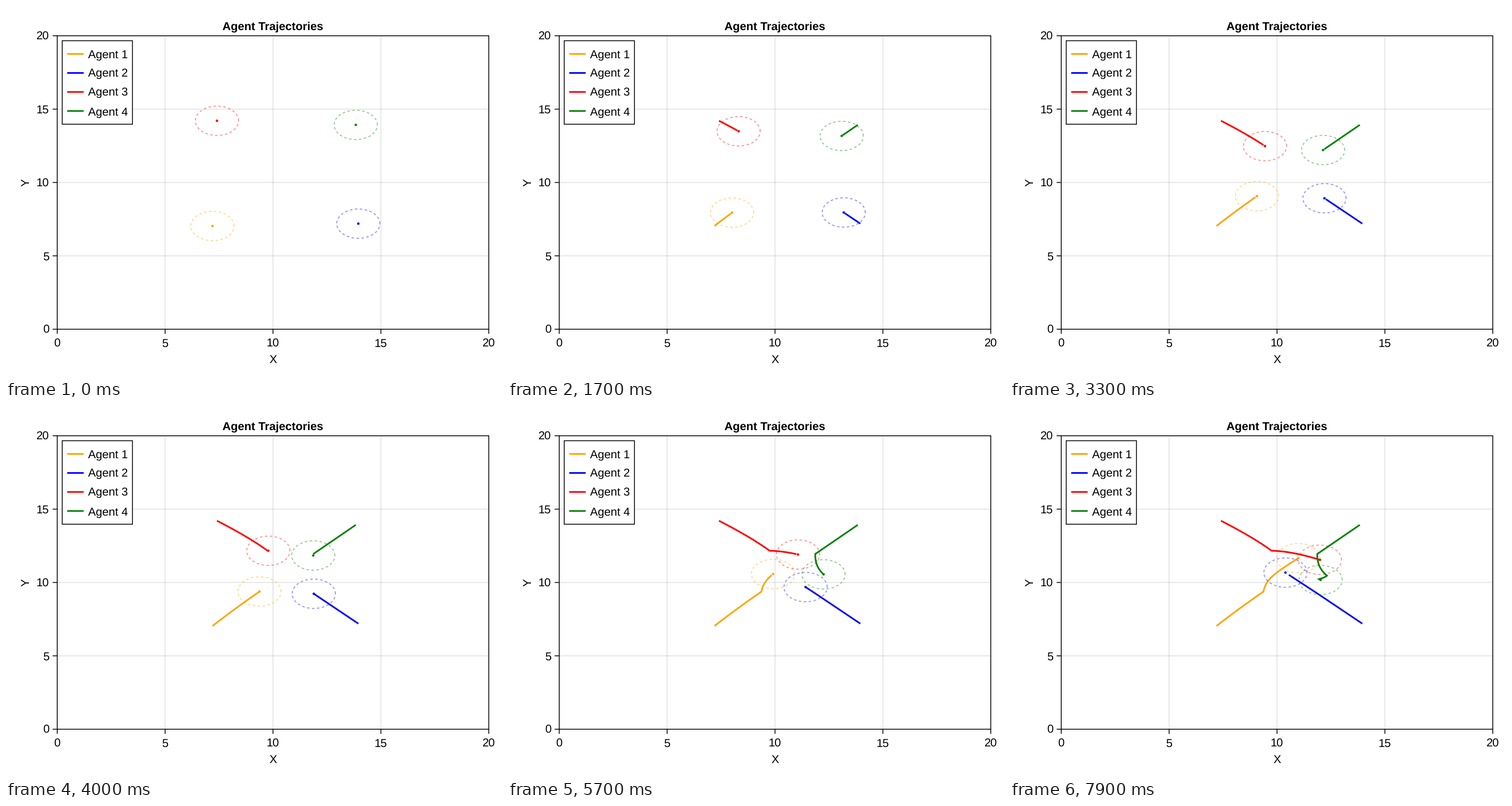
Write a matplotlib script that moves like this. It is 864 by 648 pixels and loops after 8000 ms.

```python
import numpy as np
import matplotlib.pyplot as plt
from matplotlib.animation import FuncAnimation

FRAMES, STEP_MS = 80, 100
W, H = 864, 648
S = 1.44  # pixels per layout unit
LEFT, RIGHT, TOP, BOTTOM = 62 * S, 584 * S, 36 * S, 391 * S
UNIT_X, UNIT_Y = (RIGHT - LEFT) / 20, (BOTTOM - TOP) / 20
THIN, THICK, FONT = S, 2 * S, 14 * S
TURN = 39  # step at which the agents start to avoid each other

# Bezier control points to and after the turn, and the easing after it
AGENTS = {
    "orange": ([(359.6, 383.2), (400.5, 351.5), (441.5, 323.3)],
               [[(441.5, 323.3), (446, 301.5), (459, 292.5), (502.2, 265)]],
               (1.9, 2.3)),
    "blue": ([(613.7, 379.1), (537.4, 327.9)],
             [[(537.4, 327.9), (479.8, 290.2)]],
             (0.9, 0.6)),
    "red": ([(367.5, 199.9), (425, 229.5), (455.6, 252.1)],
            [[(455.6, 252.1), (483, 252.6), (512, 259.5), (539.8, 267.9)]],
            (1.3, 2)),
    "green": ([(609.3, 207.1), (535.2, 257.8)],
              [[(535.2, 257.8), (535, 272), (538.5, 284), (552.3, 295.6)],
               [(552.3, 295.6), (547, 299.5), (538, 301.5)],
               [(538, 301.5), (541, 303)]],
              (1, 1.7)),
}

plt.rcParams.update({"font.family": "Liberation Sans",
                     "text.hinting": "no_hinting"})
fig = plt.figure(figsize=(W / 72, H / 72), dpi=72, facecolor="white")
ax = fig.add_axes([0, 0, 1, 1])
ax.set_xlim(0, W)
ax.set_ylim(H, 0)
ax.axis("off")


def line(xs, ys, color="black", lw=THIN, z=1, **kw):
    return ax.plot(xs, ys, color=color, lw=lw, zorder=z, snap=False,
                   solid_capstyle="butt", solid_joinstyle="miter", **kw)[0]


def label(x, y, text, ha="center", z=1, **kw):
    ax.text(x, y, text, ha=ha, va="baseline", fontsize=FONT, zorder=z, **kw)


def box(x0, y0, x1, y1, z, fill="none"):
    ax.add_patch(plt.Rectangle((x0, y0), x1 - x0, y1 - y0, fc=fill, ec="black",
                               lw=THIN, zorder=z, snap=False))


def draw_axes():
    for v in range(0, 21, 5):
        x, y = LEFT + v * UNIT_X, BOTTOM - v * UNIT_Y
        if 0 < v < 20:
            line([x, x], [TOP, BOTTOM], alpha=0.12)
            line([LEFT, RIGHT], [y, y], alpha=0.12)
        line([x, x], [BOTTOM, BOTTOM + 8], z=5)
        line([LEFT - 8, LEFT], [y, y], z=5)
        label(x, BOTTOM + 31, str(v))
        label(LEFT - 14, y + 7.2, str(v), ha="right")
    box(LEFT, TOP, RIGHT, BOTTOM, 5)
    mid_x, mid_y = (LEFT + RIGHT) / 2, (TOP + BOTTOM) / 2
    label(mid_x, 42, "Agent Trajectories", weight="bold")
    label(mid_x, 621.7, "X")
    label(41, mid_y, "Y", rotation=90, rotation_mode="anchor")


def draw_legend():
    box(68 * S, 42 * S, 153 * S, 143 * S, 6, "white")
    for i, color in enumerate(AGENTS):
        y = (58 + 23 * i) * S
        line([74 * S, 94 * S], [y, y], color, THICK, 7)
        label(99 * S, y + 7.5, f"Agent {i + 1}", ha="left", z=7)


def bezier(points):
    t = np.linspace(0, 1, 60)[:, None]
    p = [np.array(q) for q in points]
    while len(p) > 1:
        p = [a + (b - a) * t for a, b in zip(p, p[1:])]
    return p[0]


def travel(curves, part):
    """Points at the given parts of the length of joined curves."""
    pts = np.concatenate([bezier(c) for c in curves])
    length = np.append(0, np.cumsum(np.hypot(*np.diff(pts, axis=0).T)))
    return np.array([np.interp(part * length[-1], length, axis) for axis in pts.T])


def approach(t):
    """Even speed with a short slow spell near the start."""
    u = np.clip((t - 9) / 8, 0, 1)
    return np.clip((t - 4.5 * u * u * (3 - 2 * u)) / 33, 0, 1)


def avoid(t, a, b):
    u = np.clip((t - TURN) / (FRAMES - 1 - TURN), 0, 1)
    return 1 - (1 - u ** a) ** b


class Agent:
    def __init__(self, color, first, rest, ease):
        t = np.arange(FRAMES)
        self.x, self.y = np.where(t < TURN, travel([first], approach(t)),
                                  travel(rest, avoid(t, *ease)))
        self.trail = line([], [], color, THICK, 3)
        self.ring = line([], [], color, THIN, 3, alpha=0.5,
                         dashes=(3, 3), dash_capstyle="butt")
        self.dot = ax.add_patch(plt.Circle((0, 0), 1.5 * S, fc=color, lw=0,
                                           zorder=4, snap=False))

    def show(self, n):
        x, y = self.x[n], self.y[n]
        a = np.linspace(0, 2 * np.pi, 100)
        self.trail.set_data(self.x[:n], self.y[:n])
        self.ring.set_data(x + UNIT_X * np.cos(a), y - UNIT_Y * np.sin(a))
        self.dot.set_center((x, y))


draw_axes()
draw_legend()
agents = [Agent(color, *spec) for color, spec in AGENTS.items()]


def update(n):
    for agent in agents:
        agent.show(n)
    return []


anim = FuncAnimation(fig, update, frames=FRAMES, interval=STEP_MS,
                     init_func=lambda: update(0), repeat=True, repeat_delay=0)
plt.show()
```
